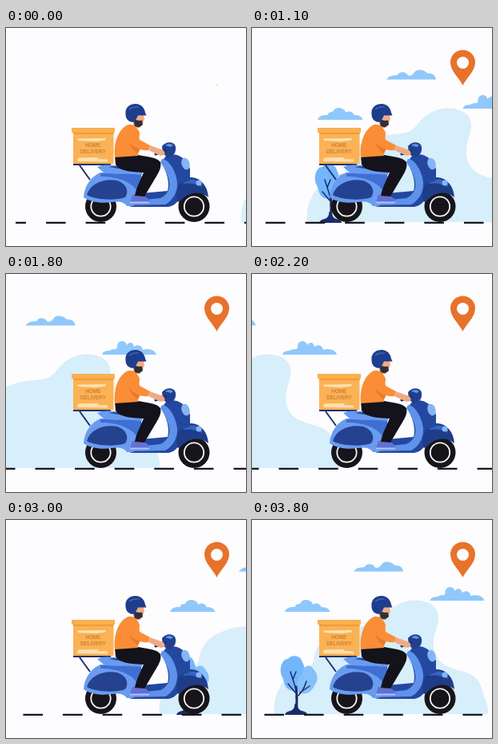
An HTML page that plays this animation: 300x273 px, repeating every 3900 ms.

```html
<!DOCTYPE html>
<html lang="en">
<head>
<meta charset="utf-8">
<title>Home delivery</title>
<style>
html, body { margin: 0; width: 100%; height: 100%; overflow: hidden; background: #fdfcfe; }
svg { display: block; width: 100vw; height: 100vh; }
</style>
</head>
<body>
<svg viewBox="0 0 300 273">
  <defs>
    <path id="hill" fill="#d7eefb" d="M-26 243C-27 231 -25 219 -20 212C-18 203 -8 196 2 194C12 190 20 186 23 176C25 160 33 147 52 140
      C70 132 86 134 97 131C111 128 112 116 125 108C137 100 154 98 167 104C180 110 181 122 177 134C170 154 171 170 186 181
      C198 189 212 188 222 195C234 203 233 215 237 223Q241 232 241 243Z"/>
    <g id="tree">
      <path fill="#74b6fb" d="M-4 214C-15 212 -14 203 -17 197C-22 188 -18 174 -10 174C-6 168 6 169 8 178C11 184 12 188 9 194L4 214Z"/>
      <path fill="#86c0fb" d="M3 216C-1 204 3 197 8 193C8 182 18 179 22 187C28 193 28 202 23 207C20 215 12 220 3 216Z"/>
      <g fill="none" stroke="#1d2b6c" stroke-linecap="round">
        <path stroke-width="3" d="M0 240Q2 225 0 209"/>
        <path stroke-width="1.5" d="M0 212L-7 190M0 222Q9 216 13 202M-1 216L-10 205M5 216L17 208M-4 200L0 190"/>
      </g>
      <path fill="#1d2b6c" d="M-14 244Q-13 240 -7 239Q-2 238 -1.5 230H2Q2 238 7 239Q14 240 14 244Z"/>
    </g>
    <g id="clouds" fill="#90c8fb">
      <path d="M307.500 115C310 109 315 109 320 109C322 103 326 107 327 104C330 98 340 99 343 106C347 103 352 105 353 109C359 109 363 111 364 115Z"/>
      <path d="M393.500 64.500C398 58 403 60 407 59C411 53 418 55 421 60C426 60 427 57 430 54C435 51 442 53 445 57C451 56 455 60 455.500 64.500Z"/>
      <path d="M489 101C491 95 497 97 501 95C504 92 505 97 508 92C507 83 518 81 520 89C524 84 528 86 529 91C535 87 539 90 540 95C548 92 556 96 557 101Z"/>
    </g>
    <g id="wheel">
      <circle r="19.500" fill="#18151a"/>
      <circle r="12.200" fill="none" stroke="#f4f5fa" stroke-width="1.800"/>
    </g>
  </defs>
  <rect width="300" height="273" fill="#fdfcfe"/>
  <use id="hillLayer" href="#hill"/>
  <use id="cloudLayer" href="#clouds"/>
  <use id="treeLayer" href="#tree"/>
  <g id="pin">
    <path fill="#e8722a" d="M0 0C-4 -9 -15.500 -18 -15.500 -29A15.500 15.500 0 0 1 15.500 -29C15.500 -18 4 -9 0 0Z"/>
    <circle cy="-28.500" r="7.500" fill="#fdfcfe"/>
  </g>
  <path id="road" stroke="#15171c" stroke-width="2.200" fill="none"/>

  <g id="box">
    <path d="M84 171H131M92 172L105 190M129 171L133 181" stroke="#25306b" stroke-width="2" fill="none"/>
    <path fill="#fbb255" d="M84 130H134.500V170H84Z"/>
    <path fill="#fab04f" d="M82 125H136V131H82Z"/>
    <path fill="#f09b3b" d="M84 131H134.500V133H84Z"/>
    <path fill="#fde1b0" d="M89 138.500L125 138L124 140.500L112 142L90 141ZM90 162.500L116 162L114 164L127 164.500V167.500L89 167Z"/>
    <g fill="#cf8136" font-family="'Liberation Sans', Arial, sans-serif" font-weight="700" font-size="6.400" text-anchor="middle">
      <text x="108.800" y="148.800">HOME</text>
      <text x="108.800" y="156.500">DELIVERY</text>
    </g>
  </g>

  <g id="scooter">
    <use href="#wheel" x="118.500" y="223.500"/>
    <use href="#wheel" x="235" y="223.500"/>
    <path fill="#2448a0" d="M147 209L202 204C205 194 201 180 194 168L201 159C213 166 222 188 221 202C219 214 213 222 203 224H158C150 223 147 218 147 209Z"/>
    <path fill="#5f92ea" d="M195 164C204 164 213 181 214 193C215 207 207 217 199 221L158 222L156 217L193 213C204 208 207 198 202 185Q199 176 193 168Z"/>
    <path fill="#699bf0" d="M97 212C98 198 106 186 118 181L167 182C173 192 172 204 165 213L159 223H151C147 217 140 217 132 218C119 220 105 218 97 212Z"/>
    <path fill="#24428f" d="M101 209C105 195 122 188 139 191C151 195 154 205 149 212C139 216 112 216 101 209Z"/>
    <path fill="#3f6fd2" d="M118 182L168 182C172 190 170 200 165 206C159 194 142 186 118 186Z"/>
    <path fill="#699bf0" d="M114 174C123 169 141 172 171 177L170 184C152 182 134 184 122 181Z"/>
    <path fill="#25458f" d="M128 174Q148 171 172 177L171 181Q148 177 128 174Z"/>
    <path fill="#1f3c88" d="M214 217C211 200 219 187 232 187C244 188 252 198 253 212C240 202 226 207 217 218Z"/>
    <path fill="#3665c4" d="M222 192Q235 186 245 195L245 199Q234 193 222 195Z"/>
    <path fill="#2448a0" d="M202 159C213 156 224 161 230 176L230 191L218 195C215 180 210 168 202 159Z"/>
    <ellipse cx="224.500" cy="170" rx="5" ry="7.500" transform="rotate(-18 224.500 170)" fill="#86b5f6"/>
    <circle cx="241" cy="194" r="3.500" fill="#86b5f6"/>
    <path fill="#203f8f" d="M195 148C200 141 211 142 212 149C213 156 209 161 202 162L196 157Z"/>
    <path fill="#5f92ea" d="M199 147Q204 143 209 147L206 149Z"/>
    <path stroke="#1c2f66" stroke-width="3" stroke-linecap="round" d="M187 158L199 154"/>
  </g>

  <g id="rider">
    <path fill="#6271d2" d="M158 209L171 210Q180 213 179 218H155Z"/>
    <path fill="#b5c1f5" d="M155 217.500H179V219.500H155Z"/>
    <path fill="#14121a" d="M136 160L165 159C176 161 189 162 193 168C195 175 190 182 186 189L173 211L161 210C163 199 169 189 172 181C158 180 143 180 137 171Z"/>
    <path fill="#e9a582" d="M159 116H168V125H159Z"/>
    <path fill="#f0ad88" d="M163 107H171.500L173 114L171 120H162Z"/>
    <path fill="#30303a" d="M159 113Q163 117 170 115.500L171 121Q167 126 161 123Z"/>
    <path fill="#fa8d36" d="M153 121C159 120 164 124 167 131L165 160L136 162C134 145 140 126 153 121Z"/>
    <path fill="#e77a2b" d="M153 134Q157 148 168 151L165 157Q153 150 153 134Z"/>
    <path fill="#fa8d36" d="M150 128C156 122 164 129 167 140L180 147L178 153C168 154 156 149 152 139Z"/>
    <path fill="#efaa85" d="M180 147L194 152Q200 154 198 159L193 160L178 153Z"/>
    <path fill="#1e3d8c" d="M149.500 108C148.500 99 155 95 162 95C169 95 173 100 174 106L175.500 109.500H165L161 117.500C155 119 149.500 115 149.500 108Z"/>
    <path fill="none" stroke="#3f6cc5" stroke-width="1.200" d="M154 102Q159 98 166 99"/>
  </g>
</svg>
<script>
const LOOP = 3900, STEP = 100, CYCLE = 2500;
const $ = id => document.getElementById(id);
const move = (id, x) => $(id).setAttribute("transform", `translate(${x} 0)`);

function dashes(shift) {
  const gap = 49.6, edge = 12 - shift;
  let d = "";
  for (let x = 0.4 - shift; x < 300; x += gap) {
    if (x > -25) d += `M${Math.max(x, edge)} 243.8H${x + 24.6}`;
  }
  return d;
}

// Quick pop from a dot to full size
function pop(s) {
  const u = 1 - Math.min(1, s / 0.2);
  return Math.max(0.03, 1 - u * u);
}

function draw(ms) {
  const s = ms % CYCLE / 1000;
  move("hillLayer", 320.5 - 205 * s);
  move("cloudLayer", -205 * s);
  move("treeLayer", 334.5 - 215 * s);
  $("road").setAttribute("d", dashes(255.5 * s));
  $("pin").setAttribute("transform", `translate(263.5 72) scale(${pop(s)})`);
}

const begin = performance.now();
function tick() {
  const ms = (performance.now() - begin) % LOOP;
  draw(Math.floor(ms / STEP) * STEP);
  requestAnimationFrame(tick);
}
draw(0);
requestAnimationFrame(tick);
</script>
</body>
</html>
```
